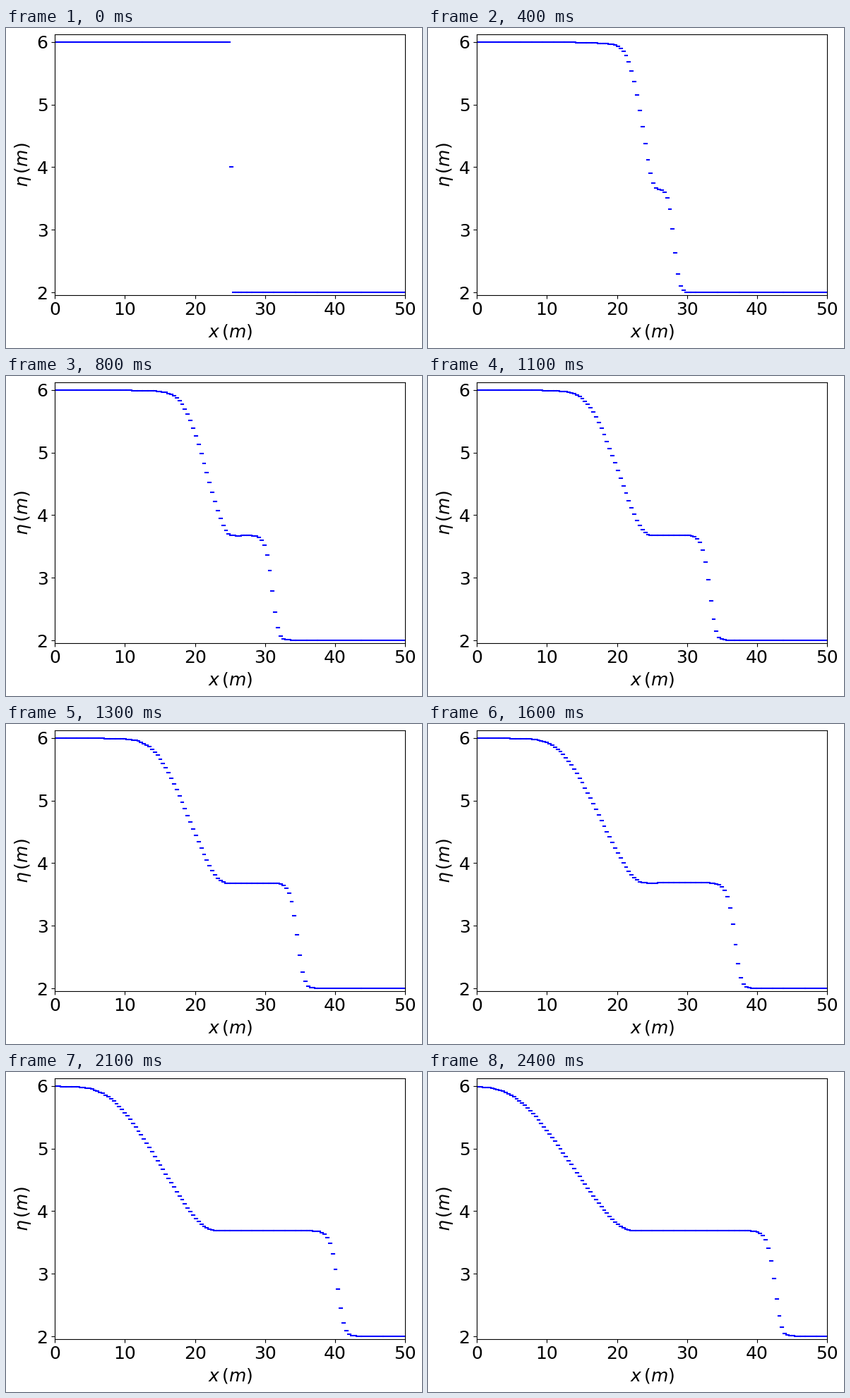
Animation of 589x454 px, one loop 2500 ms. Source, as a matplotlib script:

```python
import numpy as np
import matplotlib.pyplot as plt
from matplotlib.animation import FuncAnimation
from matplotlib.collections import LineCollection

W, H, DPI = 589, 454, 100
G = 9.81
LENGTH, LEVELS = 50.0, 7
CELLS = 2**LEVELS
DX, DT = LENGTH / CELLS, 0.01
FRAMES, STEPS = 25, 10
EPS = 1e-3
AHEAD = 2**2.5  # details this far above the threshold refine one level more

plt.rcParams.update({"font.family": "DejaVu Sans", "font.size": 18})


def adapt(q):
    """Haar multiresolution: drop small details, return leaf starts and sizes."""
    scale = np.maximum(1, np.abs(q).max(axis=1))[:, None]
    details, sig, bold = [], [], []
    mean = q
    for n in reversed(range(LEVELS)):
        left, right = mean[:, ::2], mean[:, 1::2]
        mean, d = (left + right) / 2, (left - right) / 2
        size = (np.abs(d) / scale).max(axis=0)
        limit = EPS * 2.0**(n - LEVELS)
        details.insert(0, d)
        sig.insert(0, size >= limit)
        bold.insert(0, size >= limit * AHEAD)
    for n in range(LEVELS - 1):
        sig[n + 1] |= np.repeat(bold[n], 2)
    for n in reversed(range(LEVELS - 1)):
        sig[n] |= sig[n + 1][::2] | sig[n + 1][1::2]

    depth = np.zeros(1, int)
    for d, s in zip(details, sig):
        kept = d * s
        mean = np.stack([mean + kept, mean - kept], axis=2).reshape(2, -1)
        depth = np.repeat(depth + s, 2)
    size = 2**(LEVELS - depth)
    starts = np.flatnonzero(np.arange(CELLS) % size == 0)
    return mean[:, starts], starts, size[starts]


def flux(q):
    h, hu = q
    return np.array([hu, hu**2 / h + G * h**2 / 2])


def hll(ql, qr):
    ul, ur = ql[1] / ql[0], qr[1] / qr[0]
    cl, cr = np.sqrt(G * ql[0]), np.sqrt(G * qr[0])
    u, c = (ul + ur) / 2 + cl - cr, (cl + cr) / 2 + (ul - ur) / 4
    sl = np.minimum(0, np.minimum(ul - cl, u - c))
    sr = np.maximum(0, np.maximum(ur + cr, u + c))
    return (sr * flux(ql) - sl * flux(qr) + sl * sr * (qr - ql)) / (sr - sl)


def step(q):
    """Advance the shallow water equations on the adapted mesh."""
    v, _, size = adapt(q)
    p = np.pad(v, ((0, 0), (1, 1)), mode="edge")
    v = v - DT / (DX * size) * np.diff(hll(p[:, :-1], p[:, 1:]), axis=1)
    return np.repeat(v, size, axis=1)


def dam_break():
    """Horizontal dashes, one per mesh cell, at every output time."""
    nodes = np.linspace(0, LENGTH, CELLS + 1)
    level = np.where(nodes <= LENGTH / 2, 6.0, 2.0)
    q = np.array([(level[:-1] + level[1:]) / 2, np.zeros(CELLS)])
    shots = []
    for _ in range(FRAMES):
        v, starts, size = adapt(q)
        shots.append([[(nodes[a], y), (nodes[a + n], y)]
                      for a, n, y in zip(starts, size, v[0])])
        for _ in range(STEPS):
            q = step(q)
    return shots


shots = dam_break()

fig = plt.figure(figsize=(W / DPI, H / DPI), dpi=DPI, facecolor="white")
ax = fig.add_axes([69.28 / W, 75.28 / H, 496 / W, 369.6 / H])
ax.set_xlim(0, LENGTH)
ax.set_ylim(0.98 * 2, 1.02 * 6)
ax.set_xticks(range(0, 51, 10))
ax.set_yticks(range(2, 7))
fig.text(317.28 / W, 10 / H, r"$x\,(m)$", ha="center", va="bottom")
fig.text(10 / W, 260.08 / H, r"$\eta\,(m)$", rotation=90,
         ha="left", va="center")

dashes = LineCollection([], colors="b", linewidths=1.5,
                        capstyle="projecting", zorder=2)
ax.add_collection(dashes, autolim=False)


def draw(i):
    dashes.set_segments(shots[i])
    return [dashes]


anim = FuncAnimation(fig, draw, frames=FRAMES, interval=100,
                     repeat=True, repeat_delay=0)
plt.show()
```
